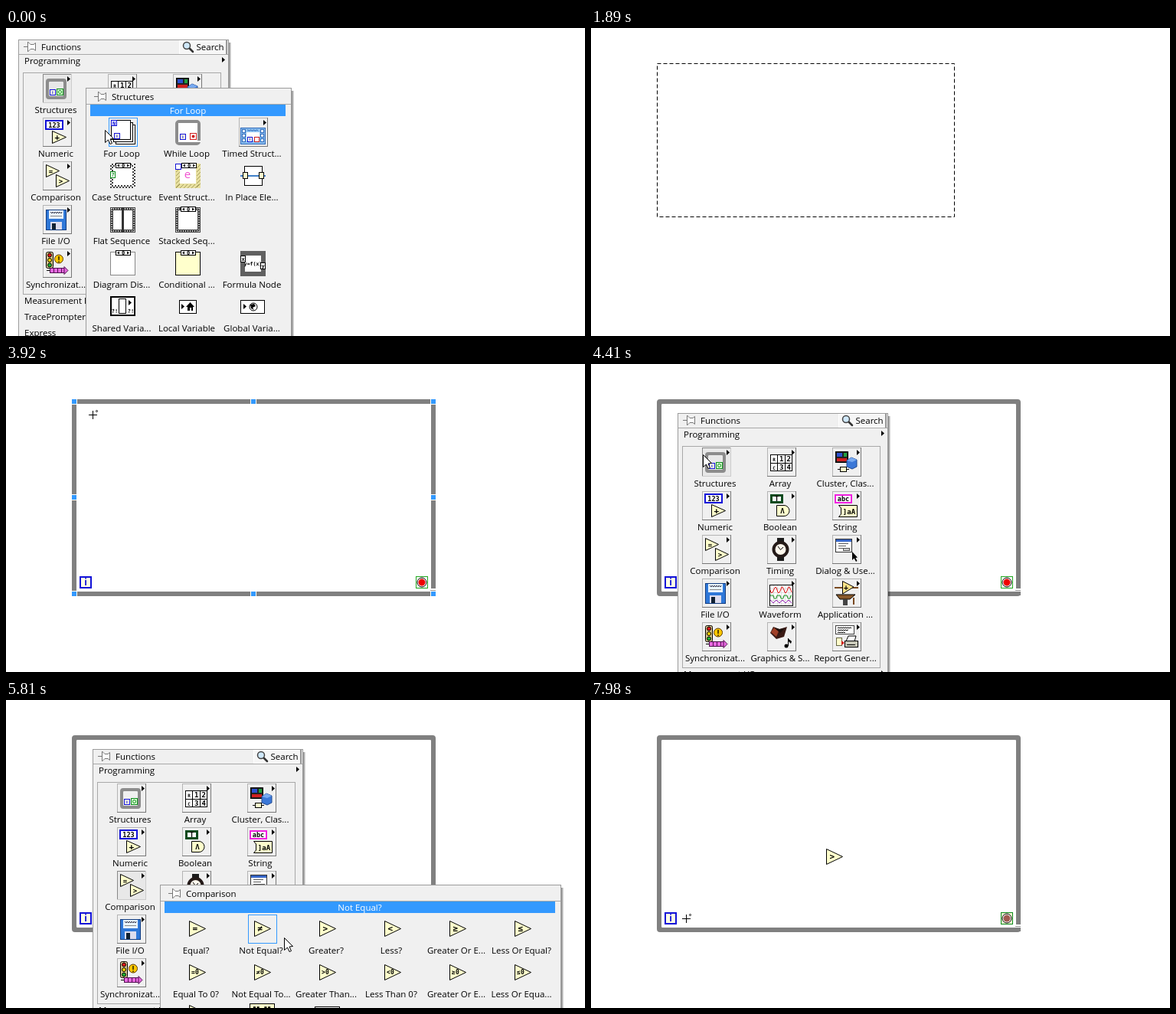
Recreate the animation shown at these times as an HTML page with a canvas. Size 756x402 px, loop 8 s.

```html
<!DOCTYPE html>
<html lang="en">
<head>
<meta charset="utf-8">
<title>Block diagram editor</title>
<style>
html, body { margin: 0; width: 756px; height: 402px; overflow: hidden; background: #fff; }
canvas { display: block; }
</style>
</head>
<body>
<canvas id="stage" width="756" height="402"></canvas>
<script>
const c = document.getElementById('stage').getContext('2d');
const UI = '"Open Sans", "Noto Sans", sans-serif';
const CODE = '"DejaVu Sans Mono", monospace';
const FACE = '#f0f0f0', BLUE = '#3399ff', CREAM = '#ffffcc', GREY = '#808080';
const NAVY = '#1010d8', GREEN = '#0a8a1a', INK = '#000';
const LOOP = 8000, TICK = 70;

function rect(x, y, w, h, color) {
  c.fillStyle = color;
  c.fillRect(x, y, w, h);
}

function box(x, y, w, h, fill, edge = INK, t = 1) {
  rect(x, y, w, h, edge);
  rect(x + t, y + t, w - 2 * t, h - 2 * t, fill);
}

function paint(fill, edge, width = 1) {
  if (fill) { c.fillStyle = fill; c.fill(); }
  if (edge) { c.strokeStyle = edge; c.lineWidth = width; c.stroke(); }
}

function poly(points, fill, edge, close = true) {
  c.beginPath();
  for (let i = 0; i < points.length; i += 2) c.lineTo(points[i], points[i + 1]);
  if (close) c.closePath();
  paint(fill, edge);
}

function dot(x, y, r, fill, edge, width) {
  c.beginPath();
  c.arc(x, y, r, 0, Math.PI * 2);
  paint(fill, edge, width);
}

function ring(x, y, w, h, t, color, r) {
  c.beginPath();
  c.roundRect(x, y, w, h, r);
  c.roundRect(x + t, y + t, w - 2 * t, h - 2 * t, r / 3);
  c.fillStyle = color;
  c.fill('evenodd');
}

function wave(x, y, w, color, fn) {
  const pts = [];
  for (let i = 0; i <= w; i++) pts.push(x + i, y + fn(i));
  poly(pts, null, color, false);
}

function text(s, x, y, color = INK, align = 'left', font = '11.5px ' + UI) {
  c.font = font;
  c.fillStyle = color;
  c.textAlign = align;
  c.fillText(s, x, y);
}

const glyph = (s, x, y, size = 9, color = INK, family = CODE) =>
  text(s, x, y, color, 'center', `bold ${size}px ${family}`);

const wedge = (x, y) => poly([x, y, x + 4, y + 3.5, x, y + 7], INK);

function node(x, y, w, h, sign, size = 11) {
  poly([x + .5, y + .5, x + w - .5, y + h / 2, x + .5, y + h - .5], CREAM, INK);
  glyph(sign, x + w * .36, y + h / 2 + size * .36, size);
}

function counter(x, y, s) {
  box(x, y, s, s, '#ffffe6', NAVY, s > 10 ? 2 : 1);
  glyph('i', x + s / 2, y + s * .76, s * .75, NAVY, UI);
}

function selector(x, y) {
  box(x, y, 20, 7, '#fff');
  poly([x + 2, y + 3.5, x + 5, y + 1.5, x + 5, y + 5.5], INK);
  poly([x + 18, y + 3.5, x + 15, y + 1.5, x + 15, y + 5.5], INK);
  glyph('0', x + 10, y + 6, 7);
}

function film(x, y, w, h) {
  box(x, y, w, h, '#fff', '#444', 4);
  for (let i = 1; i < w - 1; i += 3) {
    for (const d of [1, h - 3]) rect(x + i, y + d, 1, 2, '#ddd');
    for (const d of [1, w - 3]) rect(x + d, y + i, 2, 1, '#ddd');
  }
}

function label(x, y, w, h, s, color, t = 2) {
  box(x, y, w, h, '#fff', color, t);
  glyph(s, x + w / 2, y + h - 3, 8.5);
}

// Icons draw inside a 38 x 38 cell.
const icon = {
  structures() {
    ring(4, 6, 27, 27, 4, '#8c8c8c', 4);
    counter(9, 20, 8);
    box(18, 19, 9, 9, '#d8ffd0', GREEN);
    dot(22.5, 23.5, 2, null, GREEN);
  },
  array() {
    box(4, 9, 29, 22, '#fff');
    rect(13, 9, 1, 22, INK);
    rect(23, 9, 1, 22, INK);
    rect(4, 20, 29, 1, INK);
    ['R12', 'C34'].forEach((row, j) =>
      [...row].forEach((s, i) => glyph(s, 9 + i * 9.6, 18 + j * 11, i ? 9 : 6)));
  },
  cluster() {
    box(4, 5, 17, 15, '#222');
    rect(6, 7, 7, 5, '#2b50d0');
    rect(15, 7, 4, 5, '#20a040');
    rect(6, 14, 13, 4, '#d02020');
    poly([19, 17, 25, 13, 32, 16, 32, 25, 26, 28, 19, 25], '#3b78d8', '#234a90');
    poly([19, 17, 25, 13, 32, 16, 26, 19], '#78aaf0');
    box(10, 25, 9, 7, CREAM);
    rect(7, 28, 3, 1, INK);
    rect(19, 28, 3, 1, INK);
  },
  numeric() {
    label(3, 3, 24, 13, '123', NAVY);
    node(12, 17, 19, 17, '+');
  },
  boolean() {
    label(4, 4, 17, 12, 'T', '#0a4a1e', 3);
    c.beginPath();
    c.moveTo(12.5, 18.5);
    c.lineTo(22, 18.5);
    c.arc(22, 25.5, 7, -Math.PI / 2, Math.PI / 2);
    c.lineTo(12.5, 32.5);
    c.closePath();
    paint(CREAM, INK);
    glyph('Λ', 20, 29);
  },
  string() {
    label(3, 4, 23, 12, 'abc', '#f020e0');
    poly([8.5, 18.5, 32.5, 18.5, 32.5, 33.5, 8.5, 33.5, 11.5, 30, 11.5, 22], CREAM, INK);
    glyph(']aA', 22, 30);
  },
  comparison() {
    node(4, 4, 18, 17, '=', 9);
    node(17, 17, 18, 17, '>', 9);
  },
  timing() {
    rect(13, 4, 9, 30, '#1b1b1b');
    dot(17.5, 19, 9, '#fff8ec', '#241a18', 4);
    poly([14, 15, 17.5, 19.5, 21, 16], null, INK, false);
  },
  dialog() {
    box(4, 5, 22, 18, '#fff', '#333');
    rect(5, 6, 20, 3, '#3565c8');
    for (let i = 0; i < 3; i++) rect(8, 11 + i * 3, 13 - i * 3, 1, '#555');
    box(14, 17, 9, 4, '#ccc', '#555');
    poly([26, 22, 26, 33, 28.5, 30.5, 31, 35, 32.5, 34, 30.5, 30, 33, 29.5], INK);
  },
  file() {
    box(4, 6, 27, 27, '#2f78d8', '#123c80');
    rect(8, 7, 19, 11, '#e8f4ff');
    wave(10, 9, 15, '#334', i => i % 3);
    rect(10, 14, 15, 1, '#888');
    rect(10, 22, 15, 10, '#dde');
    rect(12, 24, 5, 8, '#123');
  },
  waveform() {
    box(3, 8, 31, 28, '#fff');
    for (let i = 5; i < 30; i += 5) {
      rect(3 + i, 9, 1, 26, '#ddd');
      rect(4, 8 + i, 29, 1, '#ddd');
    }
    wave(4, 15, 28, '#e01010', i => Math.round(4 * Math.sin(i * .7)));
    wave(4, 24, 28, '#18901c', i => i % 9 < 5 ? -2 : 2);
    wave(4, 32, 28, '#9020b0', i => -Math.abs(i % 8 - 4));
  },
  application() {
    rect(3, 11, 31, 2, '#7a4a20');
    poly([13.5, 3.5, 28, 11, 13.5, 20], '#ffe48a', INK);
    glyph('+', 18, 15, 10);
    poly([5, 21, 30, 21, 23, 27, 10, 27], '#8a5a2c', INK);
    rect(14, 27, 6, 8, '#444');
    rect(27, 25, 2, 9, '#7a4a20');
  },
  sync() {
    c.beginPath();
    c.roundRect(4.5, 4.5, 9, 21, 2);
    paint('#d8c890', INK);
    ['#e01818', '#ffd800', '#20b030'].forEach((k, i) => dot(9, 8.5 + i * 6.5, 2.5, k, INK));
    dot(21, 13.5, 5.5, '#ffc800', '#5a3a00');
    glyph('!', 21, 17.5, 10);
    for (let i = 0; i < 4; i++) box(9 + i * 5, 25, 6, 7, '#e868e0', '#501050');
    poly([28, 23.5, 33, 28.5, 28, 33.5], '#e868e0', '#501050');
    rect(5, 28, 4, 1, INK);
  },
  graphics() {
    poly([4, 14, 8, 6, 16, 9, 26, 6, 22, 19, 12, 22], '#3a1a14');
    poly([5, 13, 9, 7, 15, 12, 12, 19], '#a04028');
    poly([9, 7, 16, 9, 23, 8, 17, 14], '#1e100c');
    dot(25, 31, 2.5, INK);
    rect(27, 21, 1, 10, INK);
    poly([27, 21, 32, 25, 31, 28, 27, 24], INK);
  },
  report() {
    box(4, 4, 25, 12, '#fff', '#444');
    for (let i = 0; i < 3; i++) wave(7, 7 + i * 3, 18 - i * 4, INK, k => k % 3 ? 0 : 1);
    box(5, 20, 8, 11, CREAM, '#664');
    poly([12, 24, 16, 27, 12, 30], '#d01818');
    poly([21, 18, 31, 18, 29, 25, 18, 25], '#fff', INK);
    box(16, 24, 18, 9, '#c8c8b8');
    rect(19, 29, 11, 1, INK);
  },
  forLoop() {
    for (let i = 2; i >= 0; i--) box(3 + i * 3, 3 + i * 3, 26, 26, '#fff');
    box(3, 3, 8, 8, '#fff', NAVY);
    glyph('N', 7, 10, 7, NAVY);
    counter(7, 20, 8);
  },
  whileLoop() {
    ring(2, 3, 33, 33, 4, '#8c8c8c', 5);
    rect(6, 7, 25, 25, '#fff');
    rect(29, 30, 6, 2, '#fff');
    counter(8, 21, 8);
    box(21, 20, 9, 9, '#fff', '#d02020');
    dot(25.5, 24.5, 2, '#d02020');
  },
  timed() {
    box(2, 13, 33, 22, '#8cc0f0', '#2f68b8');
    rect(10, 19, 17, 11, '#fff');
    for (const x of [4, 28]) for (const y of [15, 21, 27]) box(x, y, 5, 5, '#e8f4ff', '#2f68b8');
    counter(11, 25, 7);
    box(20, 25, 7, 7, '#fff', '#d02020');
    wave(11, 16, 14, '#2f68b8', i => i % 4 < 2 ? 0 : 1);
  },
  caseBox() {
    box(2, 3, 33, 32, '#fff', '#444', 4);
    for (let i = 0; i < 32; i += 4) {
      for (const y of [3, 31]) { rect(2 + i, y, 2, 2, '#fff'); rect(4 + i, y + 2, 2, 2, '#fff'); }
      for (const x of [2, 31]) { rect(x, 3 + i, 2, 2, '#fff'); rect(x + 2, 5 + i, 2, 2, '#fff'); }
    }
    selector(9, 2);
    box(2, 13, 7, 9, '#fff', GREEN);
    glyph('?', 5.5, 20, 7, GREEN);
  },
  event() {
    box(2, 3, 33, 32, '#fff', '#e8e0a0', 6);
    for (let i = 0; i < 30; i += 5) {
      poly([3, 9 + i, 8, 4 + i], null, '#a8a060', false);
      poly([30, 9 + i, 35, 4 + i], null, '#a8a060', false);
      poly([3 + i, 35, 8 + i, 30], null, '#a8a060', false);
    }
    selector(10, 2);
    box(2, 3, 8, 8, '#fff', NAVY);
    text('e', 18, 22, '#f050d0', 'center', '15px ' + UI);
  },
  inPlace() {
    rect(2, 18, 33, 2, '#4080c8');
    box(7, 6, 24, 26, '#fff', INK);
    box(5, 14, 7, 9, CREAM);
    box(26, 14, 7, 9, CREAM);
    rect(12, 18, 14, 2, '#4080c8');
  },
  flat() {
    film(2, 3, 33, 33);
    rect(17, 3, 3, 33, '#333');
  },
  stacked() {
    film(2, 3, 33, 33);
    selector(9, 2);
  },
  disabled() {
    box(2, 4, 33, 31, '#fff', '#888');
    selector(9, 2);
  },
  conditional() {
    box(2, 4, 33, 31, CREAM, INK);
    selector(9, 2);
  },
  formula() {
    box(2, 3, 33, 33, '#fff', '#606060', 6);
    box(2, 9, 7, 9, '#fff');
    box(28, 18, 7, 9, '#fff');
    glyph('x', 5.5, 16, 7);
    glyph('y', 31.5, 25, 7);
    glyph('y=f(x)', 18.5, 22, 6.5);
  },
  shared() {
    box(2, 5, 33, 26, '#fff', INK, 2);
    box(13, 8, 10, 20, '#fff');
    glyph('?!', 8, 27, 7);
    glyph('?!', 29, 27, 7);
    wedge(26, 10);
  },
  local() {
    box(7, 10, 23, 18, '#fff');
    wedge(10, 15);
    poly([16, 19, 21.5, 13, 27, 19], INK);
    rect(18, 18, 7, 6, INK);
    rect(21, 20, 2, 4, '#fff');
  },
  global() {
    box(2, 10, 32, 18, '#fff');
    wedge(6, 15);
    dot(19, 19, 5, '#fff', INK);
    poly([15, 16, 20, 15, 22, 18, 18, 20, 20, 23, 16, 21], INK);
  }
};

const functions = [
  ['Structures', 'structures'], ['Array', 'array'], ['Cluster, Clas...', 'cluster'],
  ['Numeric', 'numeric'], ['Boolean', 'boolean'], ['String', 'string'],
  ['Comparison', 'comparison'], ['Timing', 'timing'], ['Dialog & Use...', 'dialog'],
  ['File I/O', 'file'], ['Waveform', 'waveform'], ['Application ...', 'application'],
  ['Synchronizat...', 'sync'], ['Graphics & S...', 'graphics'], ['Report Gener...', 'report']
].map(([name, key]) => ({ name, draw: icon[key], menu: true }));

const structures = [
  ['For Loop', 'forLoop'], ['While Loop', 'whileLoop'], ['Timed Struct...', 'timed'],
  ['Case Structure', 'caseBox'], ['Event Struct...', 'event'], ['In Place Ele...', 'inPlace'],
  ['Flat Sequence', 'flat'], ['Stacked Seq...', 'stacked'], null,
  ['Diagram Dis...', 'disabled'], ['Conditional ...', 'conditional'], ['Formula Node', 'formula'],
  ['Shared Varia...', 'shared'], ['Local Variable', 'local'], ['Global Varia...', 'global']
].map(e => e && { name: e[0], draw: icon[e[1]], menu: e[1] === 'timed' });

const tests = [
  ['=', 'Equal?'], ['≠', 'Not Equal?'], ['>', 'Greater?'],
  ['<', 'Less?'], ['≥', 'Greater Or E...'], ['≤', 'Less Or Equal?'],
  ['=0', 'Equal To 0?'], ['≠0', 'Not Equal To...'], ['>0', 'Greater Than...'],
  ['<0', 'Less Than 0?'], ['≥0', 'Greater Or E...'], ['≤0', 'Less Or Equa...']
].map(([sign, name]) => ({
  name, draw: () => node(8, 8, 22, 21, sign, sign[1] ? 8 : 11)
}));
tests.push(
  { name: '', draw: () => node(8, 4, 22, 21, '>') },
  { name: '', draw() { box(2, 2, 33, 28, CREAM); glyph('▪▪ ▪▪', 18, 10, 8); } },
  { name: '', draw: () => box(2, 6, 33, 24, '#fff') }
);

function panel(x, y, w) {
  for (let i = 0; i < 3; i++) rect(x + w + i, y + 4, 1, 402, `rgba(0,0,0,${.42 - i * .13})`);
  box(x, y, w, 460, FACE, '#9c9c9c');
}

function pin(x, y) {
  poly([x, y + 6.5, x + 5, y + 6.5], null, '#777', false);
  poly([x + 5.5, y, x + 5.5, y + 13, x + 9, y + 9.5, x + 13, y + 9.5, x + 15.5, y + 11.5,
    x + 15.5, y + 1.5, x + 13, y + 3.5, x + 9, y + 3.5], '#fff', '#777');
}

function grid(x, y, cols, items, active) {
  items.forEach((item, i) => {
    if (!item) return;
    const left = x + i % cols * 85, top = y + Math.floor(i / cols) * 57;
    if (top > 402) return;
    c.save();
    c.translate(left, top);
    if (item.menu) {
      const on = i === active;
      box(0, 0, 38, 38, on ? '#e8e8e8' : FACE, on ? '#888' : '#b4b4b4');
      rect(0, 37, 38, 1, on ? '#ccc' : '#777');
      rect(37, 0, 1, 38, on ? '#ccc' : '#777');
    } else if (i === active) {
      box(0, 0, 38, 38, FACE, BLUE);
    }
    item.draw();
    if (item.menu) wedge(32, 3);
    text(item.name, 17, 51, INK, 'center');
    c.restore();
  });
}

function cellAt(x, y, cols, p) {
  const col = Math.floor((p[0] - x) / 85), row = Math.floor((p[1] - y) / 57);
  return col < 0 || row < 0 || col >= cols ? -1 : row * cols + col;
}

function mainPalette(x, y, active) {
  panel(x, y, 275);
  pin(x + 7, y + 3);
  text('Functions', x + 30, y + 14);
  rect(x + 1, y + 19, 273, 1, '#a8a8a8');
  box(x + 210, y + 1, 63, 18, '#f6f6f6', '#fff');
  rect(x + 271, y + 1, 2, 18, '#999');
  dot(x + 220, y + 8, 4.5, '#cfe8fa', '#444', 1.5);
  c.lineCap = 'round';
  c.beginPath();
  c.moveTo(x + 224, y + 12);
  c.lineTo(x + 228, y + 16);
  paint(null, '#333', 2.5);
  c.lineCap = 'butt';
  text('Search', x + 232.5, y + 14);
  text('Programming', x + 8, y + 32);
  wedge(x + 266, y + 23);
  box(x + 6, y + 43, 259, 290, FACE, '#a8a8a8');
  grid(x + 32, y + 45, 3, functions, active);
  ['Measurement I/O', 'TracePrompter', 'Express'].forEach((s, i) => {
    text(s, x + 8, y + 345 + i * 21);
    wedge(x + 266, y + 336 + i * 21);
  });
}

function subPalette(x, y, w, title, cols, items, p) {
  const active = cellAt(x + 5, y + 38, cols, p), hit = items[active];
  panel(x, y, w);
  pin(x + 11, y + 5);
  text(title, x + 34, y + 16);
  rect(x + 1, y + 21, w - 2, 1, '#a8a8a8');
  if (hit) {
    const bar = cols * 85;
    rect(x + 6, y + 22, bar, 15, BLUE);
    text(hit.name, x + 6 + bar / 2, y + 34, '#fff', 'center');
  }
  grid(x + 30, y + 39, cols, items, active);
}

function arrow([x, y]) {
  const px = (a, b) => [x + a + .5, y + b + .5];
  poly([px(0, 0), px(0, 16), px(4, 12.5), px(6.5, 18), px(9, 17), px(6.5, 11.5), px(11, 11)].flat(),
    '#fff', INK);
}

function cross([x, y], color = INK) {
  rect(x - 6, y - 1, 13, 3, '#fff');
  rect(x - 1, y - 6, 3, 13, '#fff');
  rect(x - 5, y, 11, 1, color);
  rect(x, y - 5, 1, 11, color);
  dot(x + 5.5, y - 4.5, 1, null, color);
}

function whileFrame(selected, wired) {
  ring(86, 46, 475, 257, 6, GREY, 4);
  rect(553, 293, 8, 2, '#fff');
  rect(554, 295, 7, 1, '#999');
  rect(553, 296, 8, 1, '#fff');
  rect(555, 297, 6, 5, GREY);
  counter(96, 277, 16);
  box(535, 277, 16, 16, wired ? '#f0f5d0' : '#fff', wired ? GREEN : '#20a820');
  dot(543, 285, 6, '#fff', INK);
  dot(543, 285, 4.5, wired ? '#a05a50' : '#f00000');
  if (!selected) return;
  for (const x of [89, 323, 558]) for (const y of [49, 174, 300])
    if (x !== 323 || y !== 174) box(x - 4, y - 4, 8, 8, BLUE, '#fff');
}

function rubber(x, y) {
  c.setLineDash([5, 3]);
  c.strokeStyle = INK;
  c.lineWidth = 1;
  c.strokeRect(86.5, 46.5, x - 87, y - 47);
  c.setLineDash([]);
}

// Position on a path of [time, x, y] points.
function along(path, t) {
  let a = path[0];
  for (const b of path) {
    if (t < b[0]) {
      const k = Math.max(0, (t - a[0]) / (b[0] - a[0] || 1));
      return [1, 2].map(i => Math.round(a[i] + (b[i] - a[i]) * k));
    }
    a = b;
  }
  return [a[1], a[2]];
}

const pick = [[0, 129, 133], [280, 244, 163], [490, 244, 163], [700, 257, 144]];
const stretch = [[1470, 88, 48], [1680, 300, 150], [1890, 475, 247], [2100, 540, 285], [2310, 561, 303]];
const leave = [[2450, 559, 302], [2660, 450, 270], [3010, 213, 218], [3220, 235, 168], [3430, 165, 105],
  [3710, 121, 77], [3780, 121, 77], [3920, 113, 66]];
const browse = [[4200, 113, 66], [4410, 146, 118], [4830, 187, 235], [5460, 187, 235], [5810, 363, 310],
  [6160, 363, 310], [6440, 406, 301]];
const carry = [[6720, 390, 285], [6860, 340, 238], [7000, 303, 205], [7140, 303, 205], [7280, 307, 194]];
const finish = [[7420, 300, 216], [7700, 205, 258], [7980, 124, 285]];

function draw(t) {
  rect(0, 0, 756, 402, '#fff');
  if (t < 910) {
    const p = along(pick, t);
    mainPalette(16, 15, 0);
    subPalette(104, 78, 269, 'Structures', 3, structures, p);
    arrow(p);
  } else if (t < 2450) {
    if (t >= 1540) rubber(...along(stretch, t));
  } else if (t < 4060) {
    whileFrame(true);
    cross(along(leave, t));
  } else if (t < 6650) {
    const p = along(browse, t);
    const open = t >= 5250;
    whileFrame(false);
    mainPalette(113, 64, open ? 6 : cellAt(119, 108, 3, p));
    if (open) subPalette(201, 241, 524, 'Comparison', 6, tests, p);
    arrow(p);
  } else {
    whileFrame(false, true);
    if (t < 6720) {
      cross([406, 301], GREEN);
    } else {
      node(...along(carry, t), 22, 21, '>');
      if (t >= 7420) cross(along(finish, t));
    }
  }
}

const start = performance.now();
function tick() {
  const t = (performance.now() - start) % LOOP;
  draw(Math.floor(t / TICK) * TICK);
  requestAnimationFrame(tick);
}
tick();
</script>
</body>
</html>
```
